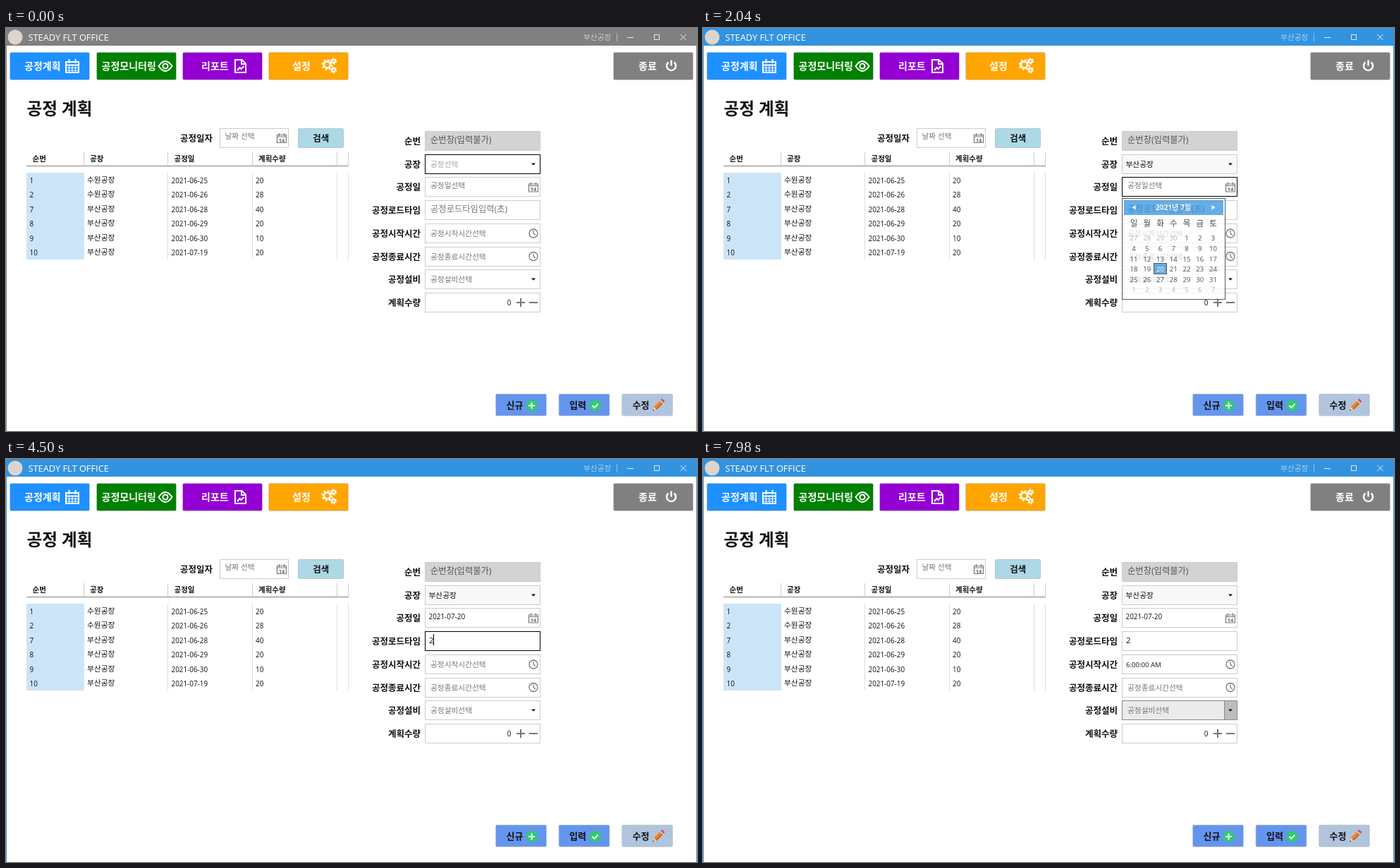
An HTML page for the animation above (8000 ms loop, 980 by 571 pixels).

```html
<!DOCTYPE html>
<html lang="ko">
<head>
<meta charset="utf-8">
<title>공정 계획</title>
<style>
  html, body { margin: 0; width: 100%; height: 100%; overflow: hidden; background: #fff; }
  svg { display: block; }
  text { font-family: 'Open Sans', 'Noto Sans CJK KR', 'Noto Sans CJK', sans-serif; font-size: 10.7px; fill: #111; white-space: pre; }
  .num { font-size: 9.9px; }
  .hint { fill: #777; }
  .big { font-size: 12.3px; }
  .label { font-size: 12.5px; font-weight: 700; }
  .menu { font-size: 14px; font-weight: 700; fill: #fff; }
  .head { font-size: 10.5px; font-weight: 700; }
  .hour { font-size: 11.3px; }
  .mid { text-anchor: middle; }
  .end { text-anchor: end; }
  .box { fill: #fff; stroke: #ccc; }
  .hover { fill: #f6f6f6; stroke: #888; }
  .focus { fill: none; stroke: #000; }
  .blue { fill: #3393df; }
  .pick { fill: #99caf0; }
  .icon { fill: none; stroke: #fff; stroke-width: 2; }
  .gray { fill: none; stroke: #777; }
</style>
</head>
<body>
<svg width="980" height="571" viewBox="0 0 980 571">
  <defs>
    <g id="cal" class="gray">
      <path d="M.5 2.5h13v11H.5zM.5 5h13M3.5 0v4M10.500 0v4" stroke-width="1.2"/>
      <text x="7" y="12.500" class="mid" style="font-size:7.500px;font-weight:700;fill:#666;stroke:none">14</text>
    </g>
    <g id="clock" class="gray" stroke-width="1.3"><circle r="6"/><path d="M0-4V0L3 2.500"/></g>
    <path id="arrow" d="M-3-1.500h6L0 1.800z" fill="#111"/>
  </defs>

  <!-- Window frame -->
  <rect width="980" height="571" fill="#fff"/>
  <g class="blue"><path d="M0 0h980v571h-1V25H1v546H0z"/></g>
  <path d="M0 0h980v571h-1V25H1v546H0z" fill="#808080" data-at="-1 0 480 180"/>
  <circle cx="13" cy="13" r="10.500" fill="#ddd5cd"/>
  <text x="31.500" y="18" style="font-size:12.800px;fill:#fff">STEADY FLT OFFICE</text>
  <text x="819" y="17" fill-opacity=".6" style="fill:#fff">부산공장</text>
  <path d="M866.500 7v12" stroke="#fff" stroke-opacity=".45"/>
  <path d="M881 13.500h9M919.500 9.500h7v7h-7zM956.500 9l8 8M964.500 9l-8 8" fill="none" stroke="#fff" stroke-opacity=".85"/>

  <!-- Menu -->
  <g id="menu"></g>
  <g class="icon">
    <path d="M85 48h18v15H85zM85 52.500h18M89.500 44v6M98.500 44v6"/>
    <path d="M89.500 53v10M94 53v10M98.500 53v10M85 56.500h18M85 60h18" stroke-width="1"/>
    <path d="M216.500 54q9.500-14 19 0q-9.500 14-19 0z"/><circle cx="226" cy="54" r="3.500"/>
    <path d="M325 45h9.500l5.500 5.500V63H325zM334 45v6h6M328 60l3.500-4 2 2 4-4"/>
    <circle cx="455.500" cy="52" r="4.500" stroke-width="2.600"/><circle cx="455.500" cy="52" r="6.800" stroke-dasharray="3 2.340"/>
    <g id="cog"><circle cx="464.500" cy="47" r="2.300"/><circle cx="464.500" cy="47" r="4" stroke-width="1.600" stroke-dasharray="2 2.190"/></g>
    <use href="#cog" y="12.500"/>
    <path d="M939.500 48.500a6.500 6.500 0 1 0 8 0M943.500 45.500v8" stroke-width="2.400"/>
  </g>
  <text x="29.500" y="122.500" style="font-size:23.600px;font-weight:700">공정 계획</text>

  <!-- Search -->
  <text x="247" y="160.500" class="label">공정일자</text>
  <rect x="303.500" y="142.500" width="97" height="27" class="box"/>
  <text x="310.500" y="157" class="hint">날짜 선택</text>
  <use href="#cal" x="384" y="149"/>
  <rect x="414.500" y="142.500" width="64" height="27" rx="1.500" fill="#add8e6" stroke="#b8c6cc"/>
  <text x="446.800" y="160.500" class="label mid">검색</text>

  <!-- Table -->
  <path d="M110.500 176v18M229.500 176v18M349.500 176v18M469.500 176v18M485.500 176v18" stroke="#ccc"/>
  <path d="M29 195.500h457" stroke="#b4b4b4" stroke-width="2"/>
  <rect x="29" y="205" width="82" height="123" fill="#cce4f7"/>
  <path d="M229.500 205v123M349.500 205v123M469.500 205v123M485.500 205v123" stroke="#ddd"/>
  <g id="table"></g>

  <!-- Form -->
  <g id="fields"></g>
  <rect x="595" y="180" width="162" height="26" fill="#f8f8fa" data-at="300 0"/>
  <rect x="594.500" y="211.500" width="163" height="27" class="hover" data-at="1200 0 1800 120"/>
  <rect x="594.500" y="244.500" width="163" height="27" class="hover" data-at="3360 0 3480 0"/>
  <rect x="594.500" y="277.500" width="163" height="27" class="hover" data-at="4920 0 5040 0"/>
  <g data-at="7680 60">
    <rect x="594.500" y="342.500" width="163" height="27" fill="#ebebeb" stroke="#888"/>
    <rect x="739.500" y="342.500" width="18" height="27" fill="#bdbdbd" stroke="#888"/>
  </g>
  <text x="602" y="163" class="big" style="fill:#555">순번창(입력불가)</text>
  <text x="602" y="197" class="hint" data-at="-120 180 1200 0">공장선택</text>
  <text x="599.500" y="197" data-at="1200 0">부산공장</text>
  <text x="602" y="227" class="hint" data-at="-1 0 2640 0">공정일선택</text>
  <text x="599.500" y="226.500" class="num" data-at="2640 0">2021-07-20</text>
  <text x="602" y="261" class="big hint" data-at="-1 0 4440 60">공정로드타임입력(초)</text>
  <text x="600" y="261" class="hour" data-at="4440 0">2</text>
  <text x="602" y="295" class="hint" data-at="-1 0 7440 0">공정시작시간선택</text>
  <text x="600" y="295" style="font-size:9.600px" data-at="7440 0">6:00:00 AM</text>
  <text x="602" y="327.500" class="hint">공정종료시간선택</text>
  <text x="602" y="360" class="hint">공정설비선택</text>
  <text x="716.500" y="393" class="num end">0</text>
  <path d="M724 389h12M730 383v12M742 389h12" stroke="#777" stroke-width="2"/>
  <use href="#arrow" x="748" y="193"/>
  <use href="#cal" x="741" y="218.500"/>
  <use href="#clock" x="748" y="291"/>
  <use href="#clock" x="748" y="323.500"/>
  <use href="#arrow" x="748" y="356"/>
  <rect x="594.500" y="179.500" width="163" height="27" class="focus" data-at="-1 0 1800 60"/>
  <rect x="594.500" y="211.500" width="163" height="27" class="focus" data-at="1800 60 3480 0"/>
  <rect x="594.500" y="244.500" width="163" height="27" class="focus" data-at="3480 0 5040 0"/>
  <rect x="594.500" y="277.500" width="163" height="27" class="focus" data-at="5040 0 7620 60"/>
  <path d="M600.500 248v16" stroke="#000" data-at="3480 0 3960 0"/>
  <path d="M606.500 248v16" stroke="#000" data-at="4440 0 5040 0"/>

  <!-- Bottom buttons -->
  <g id="actions"></g>
  <circle cx="745.500" cy="535" r="8" fill="#2ecc71"/><path d="M741 535h9M745.500 530.500v9" class="icon"/>
  <circle cx="835.500" cy="535" r="8" fill="#2ecc71"/><path d="M831.500 535l3 3 5-5.500" class="icon"/>
  <g transform="translate(925 534.500) rotate(-45)">
    <path d="M-11 0l5-2.800v5.600z" fill="#f3d3a4"/><path d="M-11 0l2-1.100v2.200z" fill="#333"/>
    <path d="M-6-2.800H6v5.600H-6z" fill="#f58220"/><path d="M-6 1H6v1.800H-6z" fill="#c85f10"/>
    <path d="M6-2.800h1.800v5.600H6z" fill="#ccc"/><path d="M7.800-2.800h2q1 0 1 1v3.600q0 1-1 1h-2z" fill="#d9534f"/>
  </g>

  <!-- Plant list -->
  <g data-at="480 180 1200 0">
    <rect x="594.500" y="207.500" width="163" height="38" fill="#fff" stroke="#999"/>
    <rect x="595" y="208" width="162" height="18.500" class="pick" data-at="600 0 900 0"/>
    <rect x="595" y="226.500" width="162" height="18.500" class="pick" data-at="900 0"/>
    <text x="600" y="221">수원공장</text>
    <text x="600" y="240">부산공장</text>
  </g>

  <!-- Month popup -->
  <g data-at="1860 240 2880 240">
    <rect x="594.500" y="241.500" width="146" height="143" fill="#fff" stroke="#222"/>
    <rect x="597" y="244" width="141" height="21" class="blue"/>
    <path d="M613.500 251v6.500l-5-3.250zM721.500 251v6.500l5-3.250z" fill="#fff"/>
    <text x="667" y="258" class="mid" style="font-size:10.200px;font-weight:700;fill:#fff">2021년 7월</text>
    <rect x="639.500" y="333.500" width="18" height="15" class="blue" stroke="#222"/>
    <g id="days"></g>
  </g>

  <!-- Time popup -->
  <g data-at="5100 240 7620 240">
    <rect x="594.500" y="305.500" width="170" height="134" fill="#fff" stroke="#d0d0d0"/>
    <circle cx="678" cy="358.500" r="48.300" fill="none" stroke="#2f90dc" stroke-width="1.800"/>
    <g id="ticks"></g>
    <path d="M678.500 358.500V316" stroke="#000" stroke-width="1.800"/>
    <path d="M678.500 358.500v28" stroke="#000" stroke-width="2" data-at="7440 0"/>
    <circle cx="678.500" cy="358" r="2.600"/>
    <rect x="599.500" y="411.500" width="56" height="24" class="box"/>
    <rect x="599.500" y="411.500" width="56" height="24" fill="#e7e7e7" stroke="#000" data-at="5880 0"/>
    <rect x="667.500" y="411.500" width="49" height="24" class="box"/>
    <rect x="717.500" y="411.500" width="42" height="24" class="box"/>
    <text x="612" y="428" class="hour" data-at="-1 0 7440 0">12</text>
    <text x="612" y="428" class="hour" data-at="7440 0">6</text>
    <text x="659.500" y="428" class="label">:</text>
    <text x="679.500" y="428" class="hour">0</text>
    <text x="722" y="427" style="font-size:10.200px">AM</text>
    <use href="#arrow" x="646" y="423"/><use href="#arrow" x="707" y="423"/><use href="#arrow" x="750" y="423"/>
  </g>

  <!-- Hour list -->
  <g data-at="6120 180 7380 180">
    <rect x="600.500" y="436.500" width="54" height="150" fill="#fff" stroke="#999"/>
    <rect x="601" y="437" width="53" height="19" class="blue"/>
    <g id="hours"></g>
  </g>
</svg>

<script>
const LOOP = 8000;
const fill = (id, html) => { document.getElementById(id).innerHTML = html; };
const text = (x, y, str, cls = '', style = '') =>
  `<text x="${x}" y="${y}" class="${cls}" style="${style}">${str}</text>`;
const button = (x, y, w, h, color) =>
  `<rect x="${x + .5}" y="${y + .5}" width="${w - 1}" height="${h - 1}" rx="2" fill="${color}" stroke="#ccc" stroke-opacity=".7"/>`;

fill('menu', [
  [5, 26, '공정계획', '#1e90ff'], [128, 135.500, '공정모니터링', '#008000'],
  [250, 277, '리포트', '#9400d3'], [372, 406, '설정', '#ffa500'], [861, 897, '종료', '#808080']
].map(([x, tx, name, color]) => button(x, 34, 114, 40, color) + text(tx, 59, name, 'menu')).join(''));

fill('actions', [
  [694, '신규', '#6495ed'], [783.500, '입력', '#6495ed'], [873, '수정', '#b0c4de']
].map(([x, name, color]) => button(x, 518, 73, 32, color) +
  text(x + 15.500, 539, name, 'label', 'font-size:13px')).join(''));

const columns = [[37.500, '순번'], [119, '공장'], [238.500, '공정일'], [358, '계획수량']];
const rows = [
  [1, '수원공장', '06-25', 20], [2, '수원공장', '06-26', 28], [7, '부산공장', '06-28', 40],
  [8, '부산공장', '06-29', 20], [9, '부산공장', '06-30', 10], [10, '부산공장', '07-19', 20]
];
fill('table', columns.map(([x, name]) => text(x, 189, name, 'head')).join('') +
  rows.map(([no, plant, date, count], i) => {
    const y = 219.700 + i * 20.450;
    return text(33.500, y, no, 'num') + text(115, y - .7, plant) +
      text(234.500, y, '2021-' + date, 'num') + text(354, y, count, 'num');
  }).join(''));

const labels = ['순번', '공장', '공정일', '공정로드타임', '공정시작시간', '공정종료시간', '공정설비', '계획수량'];
fill('fields', labels.map((name, i) => {
  const y = Math.round(146 + i * 32.700);
  return `<rect x="594.500" y="${y + .5}" width="163" height="27" class="box"${i ? '' : ' style="fill:#d3d3d3"'}/>` +
    text(588, y + 18.800, name, 'label end');
}).join(''));

const dayX = i => 611 + i % 7 * 18.750;
let days = [...'일월화수목금토'].map((d, i) => text(dayX(i), 281, d, 'mid', 'font-size:11.500px')).join('');
for (let i = 0; i < 42; i++) {
  const day = i - 3;
  const label = day < 1 ? day + 30 : day > 31 ? day - 31 : day;
  const color = day === 20 ? '#fff' : label === day ? '#111' : '#999';
  days += text(dayX(i), 301.200 + Math.floor(i / 7) * 14.650, label, 'mid', `font-size:9.500px;fill:${color}`);
}
fill('days', days);

let ticks = '';
for (let i = 0; i < 60; i++) {
  const hour = i % 5 === 0;
  const color = i % 15 === 0 ? '#4a9fe0' : hour ? '#8fc5ee' : '#d3e8f8';
  ticks += `<path d="M678-${0}" /><path d="M0-45.500v${hour ? 7.500 : 3.500}" stroke="${color}" stroke-width="${hour ? 1.500 : 1}" transform="translate(678 358.500) rotate(${i * 6})"/>`.replace('<path d="M678-0" />', '');
}
fill('ticks', ticks);

// Moments at which the pointer enters each hour, then leaves the list.
const enter = [6240, 6360, 6420, 6480, 6600, 6780, 7200, 9000];
fill('hours', [12, 1, 2, 3, 4, 5, 6].map((h, i) => {
  const y = 437.500 + i * 18.450;
  const mark = i ? `<rect x="601" y="${y}" width="53" height="18.500" class="pick" data-at="${enter[i]} 0 ${enter[i + 1]} 0"/>` : '';
  return mark + text(611, y + 13.500, h, 'hour', i ? '' : 'fill:#fff');
}).join(''));

// data-at: start, fade-in, end, fade-out in ms
const timed = [...document.querySelectorAll('[data-at]')].map(el => {
  const [start, rise, end = LOOP * 2, fall = 0] = el.dataset.at.split(' ').map(Number);
  return { el, start, rise, end, fall };
});
const ramp = (t, from, span) =>
  span ? Math.min(1, Math.max(0, (t - from) / span)) : +(t >= from);

function draw(now) {
  const t = now % LOOP;
  for (const { el, start, rise, end, fall } of timed) {
    const alpha = ramp(t, start, rise) * (1 - ramp(t, end, fall));
    el.style.opacity = alpha;
  }
}
let origin;
function tick(now) {
  origin ??= now;
  draw(now - origin);
  requestAnimationFrame(tick);
}
draw(0);
requestAnimationFrame(tick);
</script>
</body>
</html>
```
